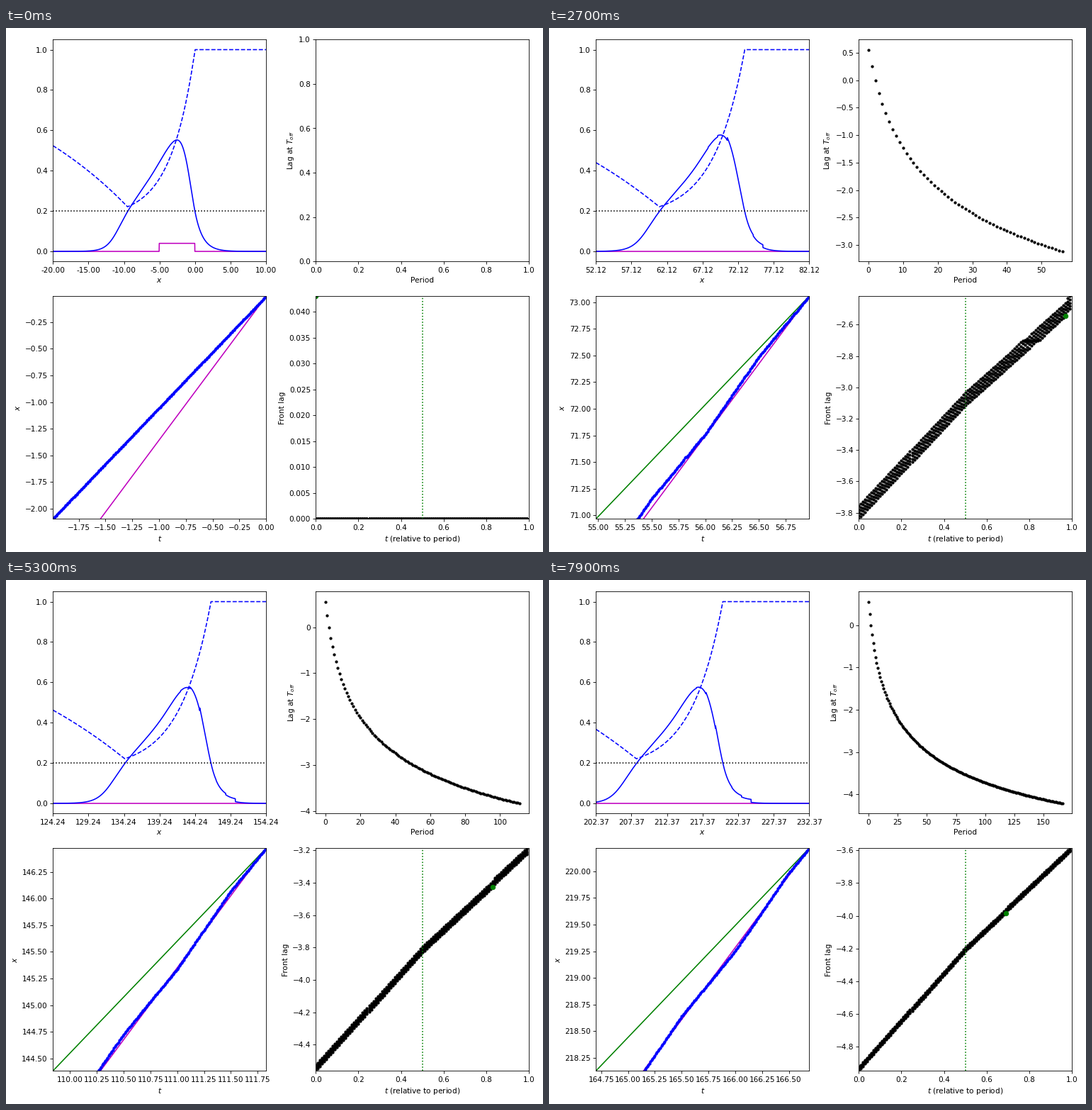
Animation of 758x739 px, one loop 8 s. Source, as a matplotlib script:

```python
import numpy as np
import matplotlib.pyplot as plt
from matplotlib.animation import FuncAnimation

W, H, DPI = 758, 739, 75.8
FRAMES, INTERVAL = 80, 100
STEPS = 211          # time steps per frame, 0.01 each
C = 1.3509           # stimulus shift per period
V0 = 1.05            # free front speed
T_OFF = 0.5
BOX = 5.0            # stimulus width
SPAN = 1.99          # time shown in the path panel


def sigmoid(x):
    return 1 / (1 + np.exp(-x))


def drift(t):
    """Slow drift of the front against the stimulus, nearly logarithmic."""
    t = np.asarray(t, float)
    s = np.log1p(np.maximum(t, 0) / 3)
    late = .043 - s * (1.396 - .4 * np.exp(-s / .75) - .0096 * s * s)
    return np.where(t < 0, .043 + (V0 - C) * t, late)


def stim_edge(step):
    return C * (step // 100) - .05


def lag(step):
    """Front position relative to the stimulus edge."""
    t, phase = step / 100, step % 100 / 100
    amp = .06 * (1 - np.exp(-np.maximum(t, 0) / 12))
    y = C * phase + drift(t) + amp * (1 - abs(2 * phase - 1))
    # the front hesitates where earlier stimuli ended
    for k in (1, 2):
        d = y + k * C
        y = y - .7 * d * np.exp(-(d / .025)**2)
    return y


def front(step):
    return stim_edge(step) + lag(step)


def pulse(z):
    """Sloping plateau between a rising back and a falling front."""
    d = z + 5
    ramp = .445 + .062 * d + .0032 * np.minimum(d, 0)**2
    body = ramp * sigmoid(1.1 * (z + 11.1)) * sigmoid(-1.4 * (z + .75))
    return np.where(z < 0, body, .196 * np.exp(-z / 1.1))


def wave(x, step):
    """Pulse and recovery curves on the grid x."""
    t, phase, period = step / 100, step % 100 / 100, step // 100
    xi = x - front(step)
    s = (C + (drift(t) - drift(t - 9)) / 9) / V0   # stretch with mean speed
    z = np.where(xi < 0, xi / s, xi)
    u = pulse(z) + .08 * (s - 1) * np.exp(-((z + 3) / 1.8)**2)
    # remains of the latest stimuli
    for k in range(min(period, 2) + 1):
        size = .5**k * (min(phase / T_OFF, 1) if k == 0 else 1)
        right = stim_edge(step) - k * C
        left = right - BOX
        u += .015 * size * ((xi > 0) & (x < right)) * (1 - np.exp(-abs(xi)))
        u += .014 * size * (x > left) * np.exp(-np.maximum(x - left, 0) / .8)
    back = -9.5 * s
    decay = .17 + .83 * np.exp(np.clip(xi, back, 0) / (3.41 * s))
    regrow = np.exp(np.minimum(xi - back, 0) / (21.3 * s))
    return u, 1 - (1 - decay) * regrow


def padded(lo, hi):
    pad = .05 * (hi - lo)
    return lo - pad, hi + pad


fig = plt.figure(figsize=((W + .01) / DPI, (H + .01) / DPI), dpi=DPI)


def panel(left, top, height, xlabel, ylabel):
    ax = fig.add_axes([left / W, 1 - (top + height) / H, 301 / W, height / H])
    ax.set_xlabel(xlabel)
    ax.set_ylabel(ylabel)
    return ax


wave_ax = panel(66.25, 16.3, 313, '$x$', '')
off_ax = panel(437.25, 16.3, 313, 'Period', 'Lag at $T_{off}$')
path_ax = panel(66.25, 378.3, 314, '$t$', '$x$')
lag_ax = panel(437.25, 378.3, 314, '$t$ (relative to period)', 'Front lag')

stim_line, = wave_ax.plot([], [], 'm')
u_line, = wave_ax.plot([], [], 'b')
v_line, = wave_ax.plot([], [], 'b--')
wave_ax.axhline(.2, color='k', ls=':')
wave_ax.set_ylim(-.05, 1.05)

off_dots, = off_ax.plot([], [], 'k.')

free_line, = path_ax.plot([], [], 'g')
pace_line, = path_ax.plot([], [], 'm')
path_dots, = path_ax.plot([], [], 'b.')

lag_dots, = lag_ax.plot([], [], 'k.')
lag_ax.axvline(T_OFF, color='g', ls=':')
lag_now, = lag_ax.plot([], [], 'go')
lag_ax.set_xlim(0, 1)

GRID = np.linspace(-20, 10, 3001)
SHIFT = 6.01


def update(frame):
    step = STEPS * frame
    t, phase = step / 100, step % 100 / 100
    xf = float(front(step))

    # the window follows the front in jumps
    x = GRID + SHIFT * np.floor(xf / SHIFT + .585)
    u, v = wave(x, step)
    edge = stim_edge(step)
    on = (phase < T_OFF) & (x >= edge - BOX) & (x <= edge)
    stim_line.set_data(x, .04 * on)
    u_line.set_data(x, u)
    v_line.set_data(x, v)
    ticks = np.linspace(x[0], x[-1], 7)
    wave_ax.set_xlim(x[0], x[-1])
    wave_ax.set_xticks(ticks, [f'{k:.2f}' for k in ticks])

    periods = np.arange((step + 50) // 100)
    offs = lag(100 * periods + 50)
    off_dots.set_data(periods, offs)
    if len(periods):
        off_ax.set_xlim(padded(0, periods[-1]))
        off_ax.set_ylim(padded(offs.min(), offs.max()))
    else:
        off_ax.set_xlim(0, 1)
        off_ax.set_ylim(0, 1)

    past = step - np.arange(200)
    path_dots.set_data(past / 100, front(past))
    for line, speed in ((free_line, V0), (pace_line, C)):
        line.set_data([t - SPAN, t], [xf - speed * SPAN, xf])
    path_ax.set_xlim(t - SPAN, t)
    path_ax.set_ylim(xf - V0 * SPAN, xf)

    past = step - np.arange(500)
    lags = np.where(past < 0, 0, lag(past))
    lag_dots.set_data(past % 100 / 100, lags)
    lag_now.set_data([phase], [lags[0]])
    lag_ax.set_ylim(lags.min(), lags.max())


anim = FuncAnimation(fig, update, frames=FRAMES, interval=INTERVAL,
                     repeat=True, repeat_delay=0, blit=False)
plt.show()
```
